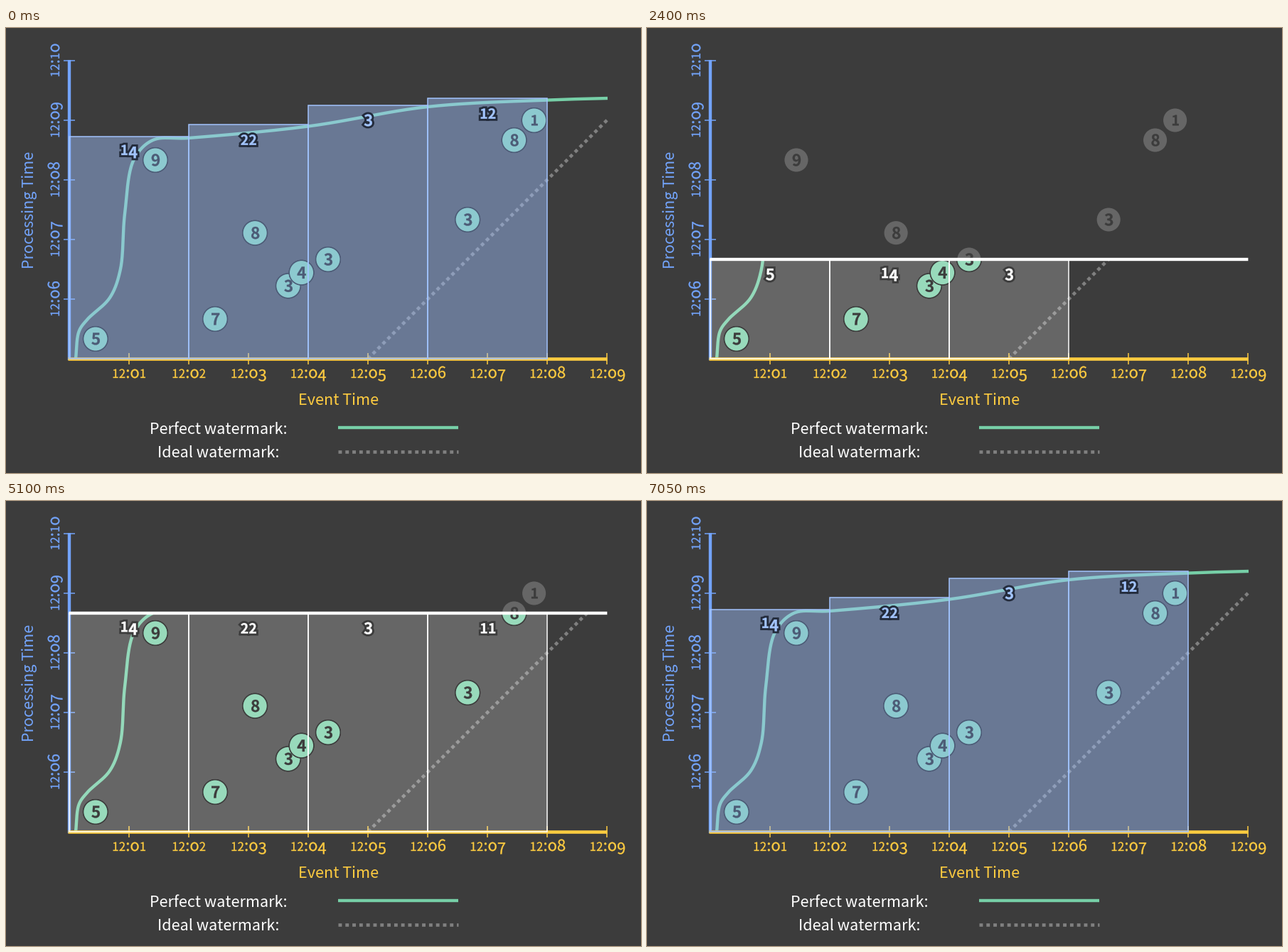
A matplotlib script for the animation above (8 s loop, 893 by 627 pixels).

```python
import numpy as np
import matplotlib.pyplot as plt
import matplotlib.patheffects as pe
from matplotlib.animation import FuncAnimation
from matplotlib.patches import Circle, PathPatch, Rectangle
from matplotlib.path import Path
from matplotlib.textpath import TextPath
from matplotlib.transforms import Bbox, TransformedBbox

W, H = 893, 627
LOOP, INTERVAL, STEP = 8000, 50, 150

BG, BLUE, YELLOW, GREEN = "#3c3c3c", "#73a4fb", "#ffcc40", "#76cfa7"
PALE_GREEN, GREY, PALE_BLUE, NAVY = "#98dabb", "#666666", "#a3c5ff", "#232b3b"
FONT = ["Noto Sans CJK JP", "Liberation Sans"]

LEFT, RIGHT, TOP, BASE = 88.5, 845.4, 46, 466
MINUTE_X, MINUTE_Y = (RIGHT - LEFT) / 9, 84
RISE = MINUTE_Y / 9          # the sweep climbs a ninth of a minute per step
DASH = 4.9

# value, event time and arrival time, both in ninths of a minute
EVENTS = [(5, 4, 3), (7, 22, 6), (3, 33, 11), (4, 35, 13), (3, 39, 15),
          (8, 28, 19), (3, 60, 21), (9, 13, 30), (8, 67, 33), (1, 70, 36)]
DOTS = [(v, LEFT + e * MINUTE_X / 9, BASE - a * RISE) for v, e, a in EVENTS]

# At 72 dpi one point is one pixel.
fig = plt.figure(figsize=((W + 1e-6) / 72, (H + 1e-6) / 72), dpi=72, facecolor=BG)
ax = fig.add_axes([0, 0, 1, 1])
ax.set_xlim(0, W)
ax.set_ylim(H, 0)
ax.axis("off")


def smooth(points, n=24):
    """Centripetal spline through a few points."""
    p = np.array(points, float)
    gaps = np.sqrt(np.hypot(*np.diff(p, axis=0).T))
    slopes = np.gradient(p, np.append(0, np.cumsum(gaps)), axis=0)
    t = np.linspace(0, 1, n)[:, None]
    ease = t * t * (3 - 2 * t)
    return np.concatenate([
        p[i] + (p[i + 1] - p[i]) * ease
        + g * t * (1 - t) * (slopes[i] * (1 - t) - slopes[i + 1] * t)
        for i, g in enumerate(gaps)])


def numeral(text, px, bold=False):
    """Old-style figures as a path, y down; bold ones are centred on both axes."""
    small, step = (0.88, 0.6) if bold else (0.76, 0.57)
    verts, codes, x = [], [], 0
    for ch in text:
        size = px * small if ch in "12" else px
        drop = px * 0.2 if ch in "34579" else 0
        glyph = TextPath((0, 0), "o" if ch == "0" else ch, size=size,
                         prop={"family": FONT, "weight": "bold" if bold else "normal"})
        verts.append(glyph.vertices * (1, -1) + (x, drop))
        codes.append(glyph.codes)
        x += size * {":": 0.278, "0": 0.606}.get(ch, step)
    verts = np.concatenate(verts)
    mid = (verts.min(axis=0) + verts.max(axis=0)) / 2
    return Path(verts - mid * (1, bold), np.concatenate(codes))


def moved(path, x, y):
    return Path(path.vertices + (x, y), path.codes)


def add_path(path, color, z):
    return ax.add_patch(PathPatch(path, fc=color, ec=color, lw=0.3, zorder=z))


def line(xs, ys, color, lw, z=2, **kw):
    return ax.plot(xs, ys, color=color, lw=lw, zorder=z,
                   solid_capstyle="butt", **kw)[0]


def dotted(xs, ys, z=2):
    return line(xs, ys, "#808080", 4.6, z, dash_capstyle="butt",
                ls=(0, (DASH / 4.6, DASH / 4.6)))


def words(x, y, text, color, **kw):
    ax.text(x, y, text, color=color, fontsize=21.6, family=FONT, ha="center",
            va="baseline", rotation_mode="anchor", **kw)


# Axes
line([LEFT + 0.5] * 2, [TOP - 1, BASE + 2], BLUE, 4.4)
line([LEFT - 2, RIGHT], [BASE, BASE], YELLOW, 4.6)
for i in range(1, 10):
    x = LEFT + i * MINUTE_X
    line([x, x], [BASE - 8, BASE + 8], YELLOW, 1.5)
    add_path(moved(numeral(f"12:0{i}", 22), x, 493), YELLOW, 2)
for i in range(5):
    y = TOP + i * MINUTE_Y
    line([LEFT - 8, LEFT + 8.5], [y, y], BLUE, 1.5)
    label = numeral(f"12:{10 - i:02d}", 22)
    turned = Path(label.vertices[:, ::-1] * (1, -1), label.codes)
    add_path(moved(turned, 75, y), BLUE, 2)
words(467.5, 531, "Event Time", YELLOW)
words(38.5, 256, "Processing Time", BLUE, rotation=90)

# Legend
words(299, 571.5, "Perfect watermark:", "white")
words(298.5, 605, "Ideal watermark:", "white")
line([467, 635.5], [563.2] * 2, GREEN, 4.4)
dotted([467, 635.5], [597] * 2)

# Everything below the sweep line is revealed through this box.
seen = Bbox.from_extents(0, 0, W, H)
seen_px = TransformedBbox(seen, ax.transData)

curve = smooth([(98, 466), (102.6, 427.5), (114, 411), (146, 380), (160.7, 341),
                (167, 262), (180, 185), (206.5, 158), (257, 155), (425, 138.5),
                (593, 111), (761, 101.5), (846, 99)])
perfect = line(*curve.T, GREEN, 4.4, 1.5)
ideal = dotted([509, RIGHT], [BASE, BASE - RIGHT + 509], 1.4)
for trace in (perfect, ideal):
    trace.set_clip_box(seen_px)

for n, (value, x, y) in enumerate(DOTS):
    z = 4 + n * 0.1
    for fill, dz in ((GREY, 0), (PALE_GREEN, 0.02)):
        dot = ax.add_patch(Circle((x, y), 17.3, fc=fill, ec=BG, lw=1.5,
                                  zorder=z + dz))
    dot.set_clip_box(seen_px)
    add_path(moved(numeral(str(value), 22.5, True), x, y), BG, z + 0.04)

sweep = line([LEFT, RIGHT], [BASE, BASE], "white", 4.4, 7, snap=False)


class Window:
    """Two minutes of event time, closed once the watermark passes its end."""

    def __init__(self, i):
        self.width = 2 * MINUTE_X
        self.x = LEFT + i * self.width
        end = self.x + self.width
        self.close = np.interp(end, *curve.T) - 2.3
        self.dots = [(v, y) for v, x, y in DOTS if self.x <= x < end]
        self.tint = ax.add_patch(Rectangle((self.x, BASE), self.width, 0, lw=0,
                                           fc=(1, 1, 1, 0.22), zorder=3))
        self.frame = ax.add_patch(Rectangle((self.x, BASE), self.width, 0, lw=1.5,
                                            zorder=6 + i * 0.1))
        self.label = add_path(numeral("0", 22), "white", 8)

    def update(self, y):
        arrived = [v for v, dot_y in self.dots if dot_y >= y - 1]
        for part in (self.tint, self.frame, self.label):
            part.set_visible(bool(arrived))
        closed = y <= self.close
        top = self.close if closed else y
        for box in (self.tint, self.frame):
            box.set_y(top)
            box.set_height(BASE - top)
        color = PALE_BLUE if closed else "white"
        self.frame.set_facecolor((0.45, 0.645, 1, 0.3) if closed else "none")
        self.frame.set_edgecolor(color)
        total = numeral(str(sum(arrived)), 22, True)
        self.label.set_path(moved(total, self.x + self.width / 2, top + 21.3))
        self.label.set_color(color)
        self.label.set_path_effects([pe.withStroke(
            linewidth=6, foreground=NAVY if closed else BG)])


windows = [Window(i) for i in range(4)]


def update(frame):
    step = frame * INTERVAL // STEP
    sweeping = 1 <= step <= 46
    y = BASE - RISE * (step - 1) if sweeping else 0
    sweep.set_visible(sweeping)
    sweep.set_ydata([y, y])
    seen.y0 = y
    for window in windows:
        window.update(y)
    return []


anim = FuncAnimation(fig, update, frames=LOOP // INTERVAL, interval=INTERVAL,
                     init_func=lambda: update(0), repeat=True, repeat_delay=0,
                     blit=False)
plt.show()
```
